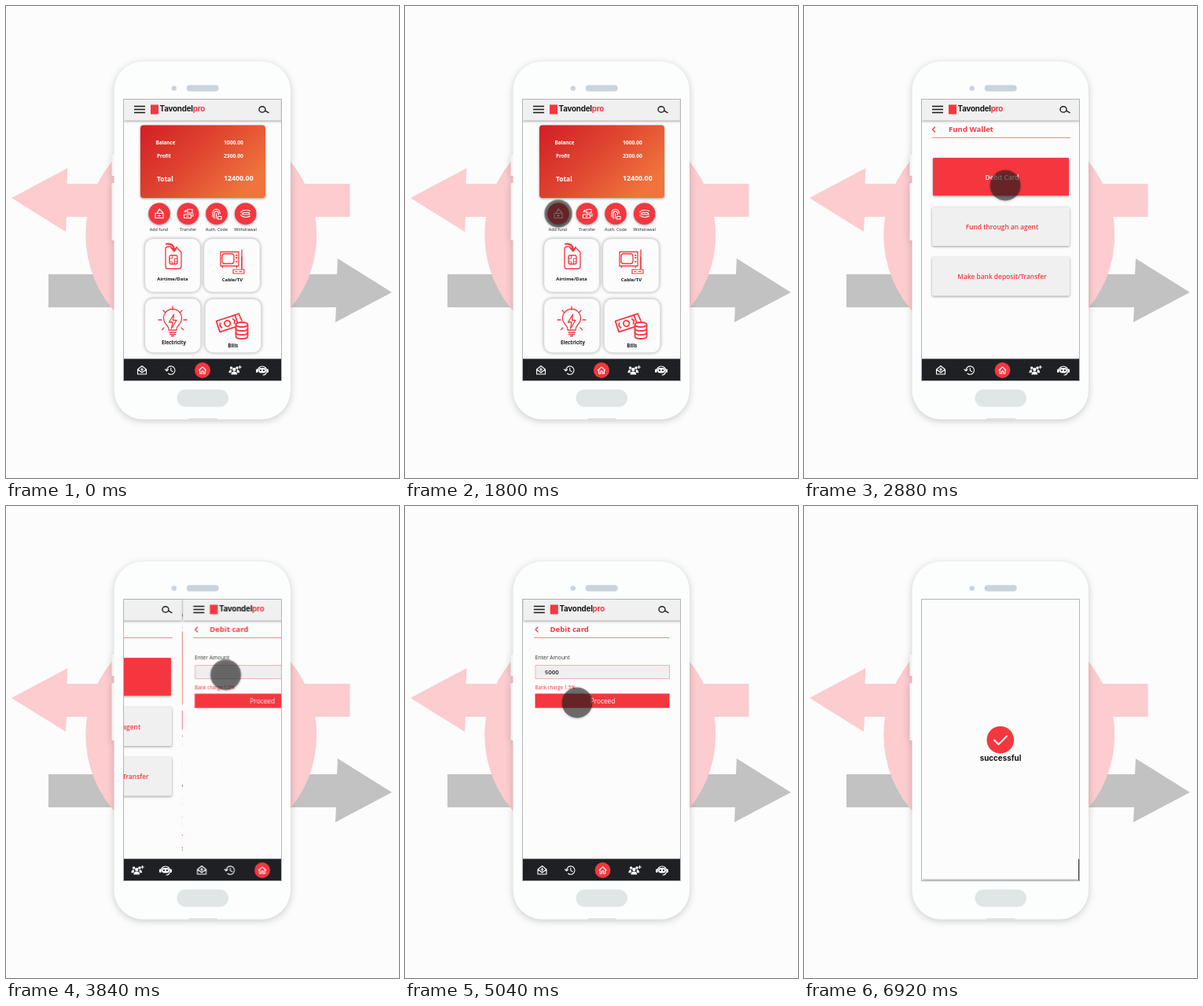
These frames come from a looping animation (500 px wide and 600 px high, 7000 ms). An HTML page:

```html
<!DOCTYPE html>
<html lang="en">
<head>
<meta charset="utf-8">
<title>Wallet top-up</title>
<style>
html, body { margin: 0; width: 100%; height: 100%; overflow: hidden; background: #fcfcfc; }
svg { display: block; }
text { font-family: "Open Sans", "Noto Sans", sans-serif; }
.mid { text-anchor: middle; }
.b { font-weight: 700; }
.s { font-weight: 600; }
.red { fill: #f4373f; }
.white { fill: #fff; }
.brand { font: 700 9.8px Inter, "Open Sans", sans-serif; letter-spacing: -.2px; }
.line { fill: none; stroke-linecap: round; stroke-linejoin: round; }
.ink { stroke: #f4373f; stroke-width: 1.3; }
.pale { stroke: #fff; stroke-width: 1.1; }
.dark { stroke: #1b1b1b; stroke-width: 1.4; }
.soft { filter: drop-shadow(0 1px 1.6px rgba(0, 0, 0, .38)); }
.tile { fill: #fcfcfc; stroke: #e2e2e2; stroke-width: .6; filter: drop-shadow(0 0 2px rgba(0, 0, 0, .35)); }
.phone { filter: drop-shadow(0 2px 5px rgba(0, 0, 0, .2)); }

.move { animation: 7s linear infinite both; }
#home { animation-name: home; }
#fund { animation-name: fund; }
#debit { animation-name: debit; }
#done { animation-name: done; }
#typed { animation-name: typed; }
#tap { animation-name: tap; }

@keyframes home {
  0%, 27% { transform: translateX(0); }
  37.71%, 100% { transform: translateX(-213px); }
}
@keyframes fund {
  0%, 27% { transform: translateX(202px); }
  37.71%, 48.36% { transform: translateX(0); }
  58.71%, 100% { transform: translateX(-202px); }
}
@keyframes debit {
  0%, 48.36% { transform: translateX(201px); }
  58.71%, 90.4% { transform: translateX(0); }
  98.8%, 100% { transform: translateX(-202px); }
}
@keyframes done {
  0%, 90.4% { transform: translateX(202px); }
  98.8%, 100% { transform: translateX(0); }
}
@keyframes typed {
  0%, 68.9% { opacity: 0; }
  72%, 100% { opacity: 1; }
}
@keyframes tap {
  0%, 7.4% { transform: translate(371px, 421px); animation-timing-function: ease-in-out; }
  17.2%, 17.7% { transform: translate(239px, 313.5px); animation-timing-function: ease-in-out; }
  25% { transform: translate(195px, 264px) scale(.87); }
  27.4%, 33% { transform: translate(195px, 263.5px); }
  37.71%, 38.29% { transform: translate(216px, 253px); }
  41.14% { transform: translate(256px, 228px); animation-timing-function: ease-out; }
  48%, 48.6% { transform: translate(283px, 211px); animation-timing-function: ease-out; }
  57.7%, 58.9% { transform: translate(279px, 215px); animation-timing-function: ease-in-out; }
  68.6%, 79.4% { transform: translate(219px, 250px); animation-timing-function: ease-in-out; }
  86.3%, 90.4% { transform: translate(251px, 249px); opacity: 1; }
  93.5%, 100% { transform: translate(251px, 249px); opacity: 0; }
}
</style>
</head>
<body>
<svg width="500" height="600" viewBox="0 0 500 600">
<defs>
  <linearGradient id="warm" x1="0" y1="0" x2="1" y2=".6">
    <stop offset="0" stop-color="#d21e25"/>
    <stop offset=".5" stop-color="#df4430"/>
    <stop offset="1" stop-color="#f0743c"/>
  </linearGradient>
  <clipPath id="glass"><rect x="150" y="119" width="201" height="358"/></clipPath>

  <rect id="page" x="150" y="119" width="201" height="358" fill="#fcfcfc"/>

  <g id="header">
    <rect class="soft" x="150" y="117" width="201" height="28.5" fill="#f0f0f0"/>
    <path class="line dark" style="stroke-linecap:butt" d="M163 127.5h14M163 131.5h14M163 135.5h14"/>
    <rect class="red" x="184" y="125.5" width="10" height="12"/>
    <text class="brand" x="195.6" y="134.3" fill="#161616">Tavondel<tspan class="red">pro</tspan></text>
  </g>
  <g id="search" class="line dark">
    <ellipse cx="-2" cy="-.6" rx="4" ry="3.7"/><path d="M1.6 1.2L6 3.6"/>
  </g>
  <rect id="bar" x="150" y="448.5" width="201" height="28.5" fill="#1f2024"/>

  <g id="mail" class="line pale">
    <path d="M-5.5-1L0-5.5 5.5-1V5H-5.5ZM-5.5-1L0 3 5.5-1M0-3V1M-1.8-1H1.8"/>
  </g>
  <g id="clock" class="line pale">
    <path d="M-4.4 0A5.2 5.2 0 1 1-2.4 4.2M-6.5-1.2L-4.4 1-2.4-1.2M.8-2.8V.4L3 1.8"/>
  </g>
  <g id="house">
    <circle class="red" r="10"/>
    <path class="line pale" d="M-4.6 0L0-4.2 4.6 0M-3.4-.8V4.2H-1.1V1H1.1V4.2H3.4V-.8"/>
  </g>
  <g id="people" class="white">
    <circle cx="-4.4" cy="-3" r="1.8"/><circle cx="3" cy="-3" r="1.8"/><circle cx="-.7" cy="-1" r="2.2"/>
    <path d="M-7.6 3.2Q-7.4-.8-4.4-.8-3.4 1-4.6 3.2ZM6.2 3.2Q6-.8 3-.8 2 1 3.2 3.2ZM-4.6 5.5Q-4.4 1.4-.7 1.4 3 1.4 3.2 5.5Z"/>
    <path class="line pale" stroke-width=".9" d="M6.6-5.8v3.6M4.8-4h3.6"/>
  </g>
  <g id="bot">
    <path class="line pale" d="M-6 1A6 6 0 0 1 6 1M5.5 2.5Q4.5 6 1 6"/>
    <rect class="white" x="-8" y="-1.5" width="2.5" height="4.5" rx="1"/>
    <rect class="white" x="5.5" y="-1.5" width="2.5" height="4.5" rx="1"/>
    <rect class="white" x="-4.8" y="-3" width="9.6" height="6.6" rx="3"/>
    <circle cx="-2" cy=".2" r="1.1" fill="#1f2024"/><circle cx="2" cy=".2" r="1.1" fill="#1f2024"/>
  </g>

  <g id="homeTop">
    <use href="#header"/>
    <use href="#search" x="328" y="132"/>
    <rect class="soft" x="171" y="151.5" width="159" height="92.5" rx="4" fill="url(#warm)"/>
    <g class="white b" font-size="6.3">
      <text x="190.5" y="176.2">Balance</text><text x="277" y="176.2" font-size="6.7">1000.00</text>
      <text x="192" y="193.4">Profit</text><text x="277" y="193.4" font-size="6.7">2300.00</text>
      <text x="192" y="222.8" font-size="8.4">Total</text><text x="277" y="222" font-size="8.8">12400.00</text>
    </g>
    <g class="red soft">
      <circle cx="195" cy="264" r="13.8"/><circle cx="231.5" cy="264" r="13.8"/>
      <circle cx="268" cy="264" r="13.8"/><circle cx="304.7" cy="264" r="13.8"/>
    </g>
    <g class="line pale" stroke-width="1">
      <path d="M190 263.5h10v6h-10ZM192 263l3.5-4.5 4 4M193.5 260l2-2.5M195 265v3M193.5 266.5h3"/>
      <path d="M231 258.5h6v4.5h-6ZM226.5 265h9v4.5h-9ZM229 262v-2.5l-2 2M235 267h3v-3M230 267.2h2"/>
      <path d="M263 268v-5a4.6 4.6 0 0 1 9.2 0v1M265 270v-6.5a2.6 2.6 0 0 1 5.2 0v2M267.6 264v6M269.5 267.5h4.5v3.5h-4.5Z"/>
      <path d="M298.5 262q5-4.5 12-1.5M298.5 266q6 4.5 12 1M300 264l3-1.5h6l1 2.5h-8Z"/>
    </g>
    <g class="mid" font-size="5.45" fill="#222">
      <text x="194.5" y="286.2">Add fund</text><text x="231.7" y="286.2">Transfer</text>
      <text x="268" y="286.2">Auth. Code</text><text x="304.6" y="286.2">Withdrawal</text>
    </g>
    <rect class="tile" x="177" y="296" width="70" height="67.5" rx="10"/>
    <rect class="tile" x="252" y="296" width="71" height="67.5" rx="10"/>
    <rect class="tile" x="177" y="372" width="70.5" height="68.5" rx="10"/>
    <rect class="tile" x="253.5" y="372.5" width="71" height="68" rx="10"/>
    <g class="mid b" font-size="6" fill="#161616">
      <text x="212" y="348.6">Airtime/Data</text><text x="288" y="349.6">Cable/TV</text>
      <text x="213.5" y="429.6" font-size="6.2">Electricity</text><text x="288.7" y="433.6" font-size="6.2">Bills</text>
    </g>
    <g class="line ink">
      <path d="M210 306h-4q-3 0-3 3v22q0 3 3 3h14q3 0 3-3v-18l-5-5"/>
      <rect x="208" y="317" width="10" height="11" rx="2"/>
      <path d="M208 321h3.5v-4M218 321h-3.500v7M208 325h3.500v3M214.500 325h3.500" stroke-width=".9"/>
      <path d="M204 302.500q9-1 10 7M210.500 307.500l3.500 4 3-4.500" stroke-width="2.200"/>

      <path d="M273 312.500h23v18h-23ZM275.500 331v1.500M293.500 331v1.500M300 310v24"/>
      <rect x="275" y="315" width="15" height="12.500" rx="3"/>
      <path d="M293 317h.5M293 320h.5M293 325h.5" stroke-width="1.800"/>
      <path d="M289 335h14v5h-14ZM292 337.500h2M297 337.500h3M300 319v15" stroke-width="1.200"/>

      <path d="M207 412q0-4-3-7a11.500 11.500 0 1 1 16 0q-3 3-3 7ZM208 415h8M208.500 417.500h7M210.500 419.500h3"/>
      <path d="M213.500 392l-6 10h4.500l-1.500 8 6.500-10.500h-4.500Z"/>
      <path d="M212 382v4M200 387l2.500 2.500M224 387l-2.500 2.500M194 399h4M226 399h4M198.500 411.500l2.500-2.500M225.500 411.500l-2.500-2.500"/>
    </g>
    <g class="line ink" stroke-width="1.800" style="stroke-width:1.800">
      <g transform="rotate(-18 281 403)">
        <rect x="269" y="396.500" width="25" height="14.500"/>
        <circle cx="281.500" cy="403.700" r="3.700"/>
        <path d="M273 400.500l-1.500 3 1.500 3M290 400.500l1.500 3-1.500 3"/>
      </g>
      <path d="M288 394l8-3 4 9"/>
      <g fill="#fcfcfc">
        <path d="M292.500 405v15c0 4 15 4 15 0v-15"/>
        <ellipse cx="300" cy="405" rx="7.500" ry="3"/>
      </g>
      <path d="M292.500 410c0 4 15 4 15 0M292.500 415c0 4 15 4 15 0"/>
    </g>
  </g>
  <g id="homeNav">
    <use href="#bar"/>
    <use href="#mail" x="173" y="463"/><use href="#clock" x="209" y="463"/>
    <use href="#house" x="250" y="463"/><use href="#people" x="291" y="463"/><use href="#bot" x="326" y="463"/>
  </g>
</defs>

<path d="M54 341H421L422 321 491 364 419 402 420 383H54Z" fill="#c2c2c2"/>
<g fill="#fccccf">
  <circle cx="248.300" cy="291" r="147"/>
  <path d="M7 244L78.500 206 77.500 226H437.500V268H77L76 287Z"/>
</g>

<g class="phone">
  <rect x="134.500" y="189" width="6" height="27" rx="1.500" fill="#f3f4f4"/>
  <rect x="134.500" y="225" width="6" height="73" rx="1.500" fill="#f3f4f4"/>
  <rect x="137.500" y="70.500" width="224.500" height="455" rx="37" fill="#fcfdfd"/>
</g>
<circle cx="213.800" cy="104.600" r="3.200" fill="#c9d3dc"/>
<rect x="229.700" y="100.500" width="41" height="8" rx="4" fill="#c9d3dc"/>
<rect x="217.500" y="487.500" width="65.500" height="22" rx="11" fill="#e0e5e6"/>
<rect x="232" y="524" width="37" height="2" rx="1" fill="#dfe1e2"/>

<g clip-path="url(#glass)">
  <use href="#page"/>
  <use href="#homeTop" y="8"/>
  <use href="#homeNav"/>

  <g id="home" class="move">
    <use href="#page"/><use href="#homeTop"/><use href="#homeNav"/>
  </g>

  <g id="fund" class="move">
    <use href="#page"/>
    <use href="#header"/>
    <use href="#search" x="332" y="132"/>
    <path class="line ink" d="M166.500 154l-3 3 3 3"/>
    <text class="red b" x="184" y="160.300" font-size="9.600">Fund Wallet</text>
    <path d="M163 167.500H339" stroke="#ee8a8d"/>
    <g class="soft">
      <rect class="red" x="164" y="193" width="173" height="48" rx="1"/>
      <rect x="163" y="255.500" width="175" height="49.500" rx="2" fill="#f1f0f0"/>
      <rect x="163" y="319" width="175" height="49.500" rx="2" fill="#f1f0f0"/>
    </g>
    <g class="mid s red" font-size="8.400">
      <text class="white" x="252" y="220.600">Debit Card</text>
      <text x="252" y="283.800">Fund through an agent</text>
      <text x="252" y="347.300">Make bank deposit/Transfer</text>
    </g>
    <use href="#bar"/>
    <use href="#mail" x="174" y="463"/><use href="#clock" x="210.500" y="463"/>
    <use href="#house" x="252.500" y="463"/><use href="#people" x="294" y="463"/><use href="#bot" x="330" y="463"/>
  </g>

  <g id="debit" class="move">
    <use href="#page"/>
    <use href="#header" x=".8"/>
    <use href="#search" x="329" y="132"/>
    <path class="line ink" d="M169 154l-3 3 3 3"/>
    <text class="red b" x="184.500" y="160.300" font-size="9.600">Debit card</text>
    <path d="M164 167.500H336" stroke="#ee8a8d"/>
    <text x="165.500" y="194.800" font-size="6.800" fill="#333">Enter Amount</text>
    <rect x="166" y="202.500" width="170.500" height="17" fill="#f0efef" stroke="#f3b3b5"/>
    <text id="typed" class="move" x="178" y="213.600" fill="#222" style="font:600 6.800px Inter,sans-serif">5000</text>
    <text class="red" x="165.500" y="233" font-size="6.200">Bank charge 1.5%</text>
    <rect class="red" x="165.500" y="238.500" width="171" height="18.200"/>
    <text class="mid white" x="251.500" y="250.500" font-size="8.300">Proceed</text>
    <use href="#bar"/>
    <use href="#mail" x="174.500" y="463"/><use href="#clock" x="210" y="463"/>
    <use href="#house" x="251.500" y="463"/><use href="#people" x="292" y="463"/><use href="#bot" x="327" y="463"/>
  </g>

  <g id="done" class="move">
    <use href="#page"/>
    <path d="M151 475.500H348.500" stroke="#c6c6c6" stroke-width="2.500"/>
    <path d="M349.500 449V476" stroke="#3a3a3c"/>
    <circle class="red" cx="249.800" cy="297.300" r="17.300"/>
    <path class="line" d="M242 297.500l5.500 5.500 10.500-10.500" stroke="#fff" stroke-width="2"/>
    <text class="mid" x="250" y="323.600" fill="#111" style="font:700 9.800px Inter,sans-serif">successful</text>
  </g>

  <g id="tap" class="move">
    <circle class="soft" r="19.500" fill="#1e1e1e" fill-opacity=".55"/>
  </g>
</g>
<rect x="149.500" y="118.500" width="201" height="358" fill="none" stroke="#b4b4b4"/>
</svg>
</body>
</html>
```
